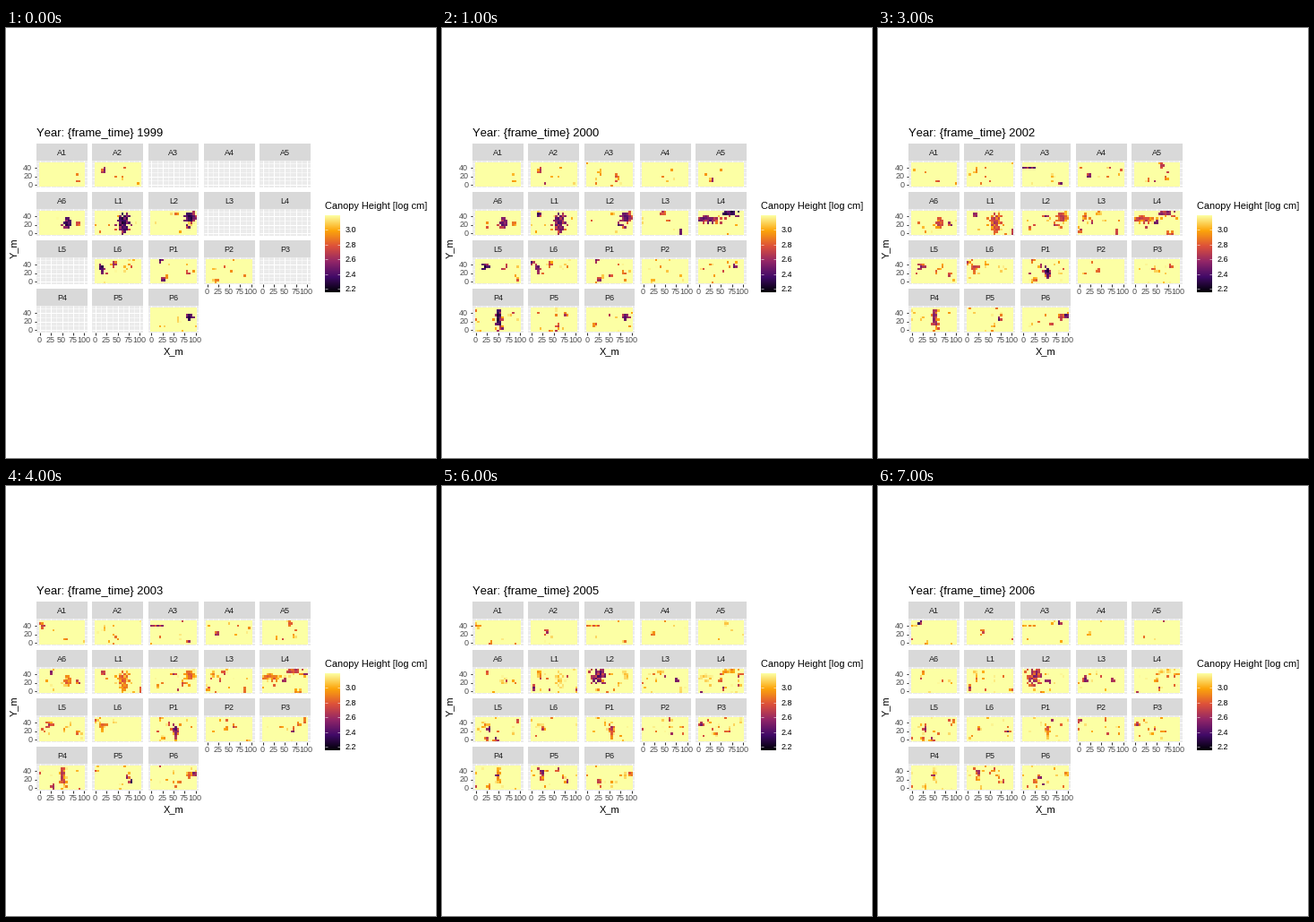
Recreate the animation shown at these times as a matplotlib script. Size 480 px wide and 480 px high, loop 8 s.

```python
import numpy as np
import matplotlib.pyplot as plt
from matplotlib.animation import FuncAnimation
from matplotlib.colors import LinearSegmentedColormap
from matplotlib.patches import Rectangle

plt.rcParams["font.family"] = "Liberation Sans"
plt.rcParams["text.kerning_factor"] = 6

SIZE, DPI = 480, 80
PT = 72 / DPI                    # points per pixel
YEARS = 8
COLS, ROWS = 21, 11              # 5 m tiles over 100 x 50 m
LOW, HIGH = 2.15, 3.2
GROWTH = 0.13                    # regrowth per year
UNIT = 0.491                     # pixels per metre
LEFT, TOP = 34.2, 148.2
STEP_X, STEP_Y = 62.2, 54
PANEL_W, PANEL_H = 115.5 * UNIT, 60.5 * UNIT
STRIP_H = 19
GREY, DARK = "#4d4d4d", "#333333"

CMAP = LinearSegmentedColormap.from_list(
    "height", ["#000004", "#420a68", "#932667", "#dd513a", "#fca50a", "#fcffa4"])

NAMES = [f"{block}{i}" for block in "ALP" for i in range(1, 7)]
LATE = {"A3", "A4", "A5", "L3", "L4", "L5", "P3", "P4", "P5"}

# Largest gaps: plot, column, row, radii in tiles, year of opening
MAIN_GAPS = [
    ("L1", 12.5, 5, 2.5, 4.5, 0),
    ("L2", 17.5, 7.5, 1.8, 3, 0),
    ("L2", 5.5, 7, 3, 3, 5),
    ("L4", 5, 6.5, 5, 1.5, 0),
    ("L4", 14.5, 9.5, 4, 1.2, 1),
    ("L5", 4.5, 7, 1.8, 1.5, 1),
    ("L6", 3, 6, 1.2, 2, 0),
    ("A3", 2.5, 8, 3.5, .5, 2),
    ("A6", 12.5, 5, 2, 2, 0),
    ("P1", 11, 4.5, 1.2, 2, 3),
    ("P4", 10.5, 5, 1.2, 4, 1),
    ("P6", 17, 6, 2, 1, 0),
]

rng = np.random.default_rng(4)
canopy = {name: np.full((YEARS, ROWS, COLS), HIGH) for name in NAMES}
row_of, col_of = np.mgrid[:ROWS, :COLS]


def open_gap(name, x, y, rx, ry, first, height=2.2):
    """Thin the canopy around a point, then let it grow back year by year."""
    d2 = ((col_of - x) / rx) ** 2 + ((row_of - y) / ry) ** 2
    hit = rng.random(d2.shape) < np.exp(-d2 ** 2 / 2)
    start = height + 0.12 * d2 + 0.2 * np.abs(rng.normal(size=d2.shape))
    for year in range(max(first, 0), YEARS):
        grown = np.where(hit, start + GROWTH * (year - first), HIGH)
        np.minimum(canopy[name][year], grown, out=canopy[name][year])


def scatter_gaps(name):
    """Small gaps opening at random; the A plots are the least disturbed."""
    amount = 1 if name[0] == "A" else 2
    for _ in range(5 * amount):
        rx, ry = rng.uniform(0.5, 1.2, 2)
        open_gap(name, rng.uniform(0, 20), rng.uniform(0, 10), rx, ry,
                 rng.integers(-3, YEARS), rng.uniform(2.2, 2.7))
    for _ in range(12 * amount):
        open_gap(name, rng.integers(COLS), rng.integers(ROWS), .6, .5,
                 rng.integers(-2, YEARS), rng.uniform(2.6, 3))


for gap in MAIN_GAPS:
    open_gap(*gap)
for plot in NAMES:
    scatter_gaps(plot)

fig = plt.figure(figsize=(SIZE / DPI, SIZE / DPI), dpi=DPI, facecolor="white")
ax = fig.add_axes([0, 0, 1, 1])
ax.axis("off")


def box(x, y, w, h, color):
    ax.add_patch(Rectangle((x, y), w, h, fc=color, lw=0, zorder=1))


def line(x0, y0, x1, y1, color, width, z=2):
    ax.plot([x0, x1], [y0, y1], color=color, lw=width * PT, zorder=z,
            solid_capstyle="butt")


def label(x, y, text, size=9, color="black", ha="left"):
    """Text centred on y by its capital height."""
    return ax.text(x, y + 0.33 * size, text, fontsize=size * PT, color=color,
                   ha=ha, va="baseline", zorder=5)


def raster(data, *extent):
    return ax.imshow(data, extent=extent, origin="lower", aspect="auto",
                     cmap=CMAP, vmin=LOW, vmax=HIGH, zorder=3,
                     interpolation="nearest")


def draw_panel(index, name):
    row, col = divmod(index, 5)
    x, y = LEFT + col * STEP_X, TOP + row * STEP_Y
    right, bottom = x + PANEL_W, y + PANEL_H

    def px(m):
        return x + (m + 7.75) * UNIT

    def py(m):
        return bottom - (m + 5.25) * UNIT

    box(x, y - STRIP_H, PANEL_W, STRIP_H, "#d9d9d9")
    box(x, y, PANEL_W, PANEL_H, "#ebebeb")
    label((x + right) / 2, y - STRIP_H / 2, name, color="#1a1a1a", ha="center")
    for i in range(9):
        line(px(i * 12.5), y, px(i * 12.5), bottom, "white", .53 if i % 2 else 1.07)
    for i in range(6):
        line(x, py(i * 10), right, py(i * 10), "white", .53 if i % 2 else 1.07)

    if col == 0:
        for m in (0, 20, 40):
            line(x - 2.7, py(m), x, py(m), DARK, 1.07)
            label(x - 4.9, py(m), str(m), color=GREY, ha="right")
    if index + 5 >= len(NAMES):
        for m in range(0, 101, 25):
            line(px(m), bottom, px(m), bottom + 2.7, DARK, 1.07)
            label(px(m) - .6, bottom + 8.6, str(m), color=GREY, ha="center")

    edges = px(-2.5), px(102.5), py(-2.5), py(52.5)
    return raster(canopy[name][0], *(round(edge) for edge in edges))


def draw_legend():
    x0, x1, top, bottom = 356, 373, 209, 295
    label(x0, 198.2, "Canopy Height [log cm]", 11)
    raster(np.linspace(LOW, HIGH, 256)[:, None], x0, x1, bottom, top)
    for i in range(5):
        y = 291.2 - 16.5 * i
        line(x0, y, x0 + 3.4, y, "white", .53, 4)
        line(x1 - 3.4, y, x1, y, "white", .53, 4)
        label(378.6, y, f"{2.2 + 0.2 * i:.1f}")


images = {name: draw_panel(i, name) for i, name in enumerate(NAMES)}
draw_legend()
title = label(34.2, 116.6, "", 13)
label(187, 360.8, "X_m", 11, ha="center")
ax.text(13.8, 245.4, "Y_m", fontsize=11 * PT, rotation=90, ha="right",
        va="center", zorder=5)
ax.set_xlim(0, SIZE)
ax.set_ylim(SIZE, 0)


def update(t):
    title.set_text(f"Year: {{frame_time}} {1999 + t}")
    for name, image in images.items():
        image.set_data(canopy[name][t])
        image.set_visible(t > 0 or name not in LATE)
    return [title, *images.values()]


anim = FuncAnimation(fig, update, frames=YEARS, interval=1000, repeat=True,
                     repeat_delay=0)
plt.show()
```
